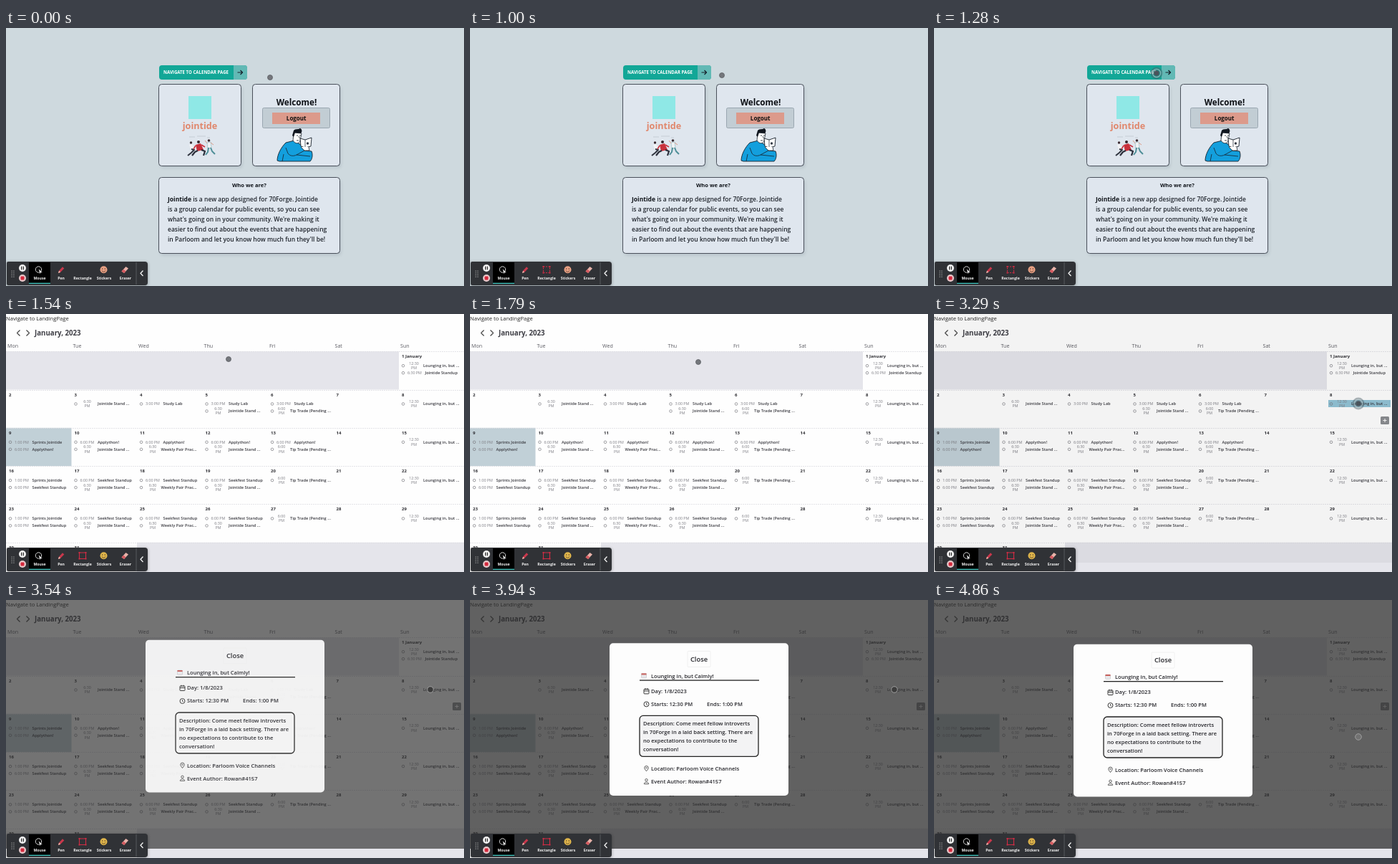
Recreate the animation shown at these times as an HTML page with a canvas. Size 640x360 px, loop 5.86 s.

```html
<!DOCTYPE html>
<html lang="en">
<head>
<meta charset="utf-8">
<title>Group calendar</title>
<style>
  html, body { margin: 0; width: 100%; height: 100%; overflow: hidden; background: #ced9de; }
  canvas { display: block; width: 640px; height: 360px; }
</style>
</head>
<body>
<canvas id="stage" width="640" height="360"></canvas>
<script>
const g = document.getElementById('stage').getContext('2d');
const LOOP = 5860;
const CALENDAR_AT = 1540, HOVER_AT = 2790, CLICK_AT = 3290, MODAL_AT = 3540;

const STEPS = [
  [0, 369, 69], [1000, 352, 66], [1140, 324, 63], [1280, 311, 63],
  [1540, 311, 63], [1790, 319, 67], [2040, 385, 86], [2290, 474, 112],
  [2540, 541, 129], [2790, 574, 128], [3040, 592, 125], [3290, 593, 125],
  [3940, 593, 125], [4200, 593, 134], [4720, 593, 178], [4860, 593, 191]
];

const EVENTS = {
  hang: { name: 'Lounging in, but ...', time: '12:30', mid: 21, x: 34 },
  stand: { name: 'Jointide Stand ...', time: '6:30', mid: 22, x: 36.5 },
  tip: { name: 'Tip Trade (Pending ...', time: '6:00', mid: 19, x: 31 },
  pair: { name: 'Weekly Pair Prac...', time: '6:30', mid: 22, x: 33.5 },
  full: { name: 'Jointide Standup', time: '6:30 PM' },
  study: { name: 'Study Lab', time: '3:00 PM' },
  sprint: { name: 'Sprints Jointide', time: '1:00 PM' },
  apply: { name: 'Applython!', time: '6:00 PM' },
  seek: { name: 'Seekfest Standup', time: '6:00 PM' }
};
const LATE_WEEK = ['sprint seek', 'seek stand', 'seek pair', 'seek stand', 'tip', '', 'hang'];
const WEEKS = [
  ['', '', '', '', '', '', 'hang full'],
  ['', 'stand', 'study', 'study stand', 'study tip', '', 'hang'],
  ['sprint apply', 'apply stand', 'apply pair', 'apply stand', 'apply tip', '', 'hang'],
  LATE_WEEK, LATE_WEEK, []
];
const colX = c => c * 91.5;
const rowY = r => 52.2 + r * 53.3;

function text(s, x, y, size, color = '#222', weight = 400, align = 'left') {
  g.font = `${weight} ${size}px "Open Sans", "Noto Sans", sans-serif`;
  g.textAlign = align;
  g.fillStyle = color;
  g.fillText(s, x, y + size * 0.34);
  return g.measureText(s).width;
}

function rect(x, y, w, h, fill) {
  g.fillStyle = fill;
  g.fillRect(x, y, w, h);
}

function box(x, y, w, h, r, fill, stroke, line = 1) {
  g.beginPath();
  g.roundRect(x, y, w, h, r);
  paint(fill, stroke, line);
}

function paint(fill, stroke, line = 1) {
  if (fill) { g.fillStyle = fill; g.fill(); }
  if (stroke) { g.strokeStyle = stroke; g.lineWidth = line; g.stroke(); }
}

function circle(x, y, r, fill, stroke, line) {
  g.beginPath();
  g.arc(x, y, r, 0, Math.PI * 2);
  paint(fill, stroke, line);
}

function shape(d, fill, stroke, line = 1) {
  const p = new Path2D(d);
  if (fill) { g.fillStyle = fill; g.fill(p); }
  if (stroke) { g.strokeStyle = stroke; g.lineWidth = line; g.stroke(p); }
}

function shadow(color, blur, dx = 0, dy = 0) {
  g.shadowColor = color;
  g.shadowBlur = blur;
  g.shadowOffsetX = dx;
  g.shadowOffsetY = dy;
}

function card(x, y, w, h) {
  g.save();
  shadow('rgba(60,75,95,.16)', 4, 2, 3);
  box(x, y, w, h, 4, '#dfe6ee');
  g.restore();
  box(x - .5, y - .5, w + 1, h + 1, 4, null, '#4a505b', 1);
}

function dancers() {
  shape('M256 152H264M267 151H279M281 153H285', null, '#b9c1c9', .7);
  // left
  circle(258.5, 160, 1.7, '#3b2a30');
  shape('M256 163L260 162L263 168L259 171Z', '#f3f4f6');
  shape('M259 169L263 170L259 174L254 178', null, '#30343f', 2);
  // middle
  circle(269, 159, 2, '#33262c');
  shape('M265 163L272 161L276 170L267 172Z', '#c9303b');
  shape('M268 171L264 173L260 178M273 170L278 172L276 178', null, '#2c2f3b', 2.2);
  shape('M265 164L262 169M273 163L278 166', null, '#c9303b', 1.5);
  // right
  circle(283.5, 157, 1.8, '#3b2a30');
  shape('M281 160L286 159L287 167L282 168Z', '#f0f2f4', '#8fb4bb', .6);
  shape('M283 167L282 173L279 177M286 167L288 172L292 176', null, '#4f8f98', 2);
  shape('M281 161L278 157M286 160L290 163', null, '#d99b86', 1);
}

function reader() {
  const ink = '#18212b';
  g.lineJoin = 'round';
  shape('M379 185C379 177 384 167 391 160L403 157L412 163L417 171L427 172C429 177 428 183 425 186H382Z', '#139fdd', ink, .9);
  shape('M391 167L394 175C397 179 402 179 406 177L417 171M386 186L388 176M406 177L425 179', null, ink, .8);
  shape('M402 146L401 157C404 162 410 162 411 157L413 147Z', '#fff', ink, .8);
  shape('M400 150L402 143C405 140 408 142 411 140C414 141 414 145 412 147L404 146L402 152Z', '#111720');
  shape('M406 150H408M410 150H412M409 151L410.500 154M406 157H409', null, ink, .8);
  shape('M411 154L418 156L427 153L426 165L418 167L412 165Z', '#fff', ink, .9);
  shape('M418 156V167', null, ink, .7);
  circle(421.5, 161, 1.7, '#353c47');
  shape('M412 166L417 171L424 171L423 166', '#fff', ink, .8);
}

function landing() {
  rect(0, 0, 640, 360, '#ced9de');
  box(214, 52, 123, 20, 4, '#12a797');
  box(318, 52, 19, 20, [0, 4, 4, 0], '#62b9b5');
  text('NAVIGATE TO CALENDAR PAGE', 220, 62.2, 6.1, '#fff', 700);
  shape('M323.500 62H330.500M327.500 59L330.500 62L327.500 65', null, '#16202a', 1.2);

  card(214, 79, 114, 113);
  rect(255, 95, 32, 32, '#8fe8e6');
  text('jointide', 271, 136.3, 12.6, '#e0876c', 700, 'center');
  dancers();

  card(345, 79, 121, 113);
  text('Welcome!', 406, 104.4, 11.7, '#0c0f14', 700, 'center');
  box(358.500, 111.500, 94, 28, 2, '#c2cdd4', '#9aa7b1', 1);
  rect(372, 118, 67, 16, '#dc9a8b');
  text('Logout', 405.7, 126.2, 8, '#111', 700, 'center');
  reader();

  card(214, 209, 252, 105);
  text('Who we are?', 340, 219.2, 7.6, '#10141a', 700, 'center');
  const ink = '#20252d', size = 8.5;
  const w = text('Jointide', 226, 238.9, size, '#10141a', 700);
  text(' is a new app designed for 70Forge. Jointide', 226 + w, 238.9, size, ink, 600);
  ['is a group calendar for public events, so you can see',
   'what\'s going on in your community. We\'re making it',
   'easier to find out about the events that are happening',
   'in Parloom and let you know how much fun they\'ll be!'
  ].forEach((s, i) => text(s, 226, 252.9 + i * 14, size, ink, 600));
}

function calendarEvent(e, x, y) {
  const gray = '#7d7d84';
  circle(x + 6, y, 1.8, null, '#77777d', .7);
  if (e.mid) {
    text(e.time, x + e.mid, y - 3.2, 5.3, gray, 400, 'center');
    text('PM', x + e.mid, y + 3, 5.3, gray, 400, 'center');
  } else {
    text(e.time, x + 12, y, 5.3, gray);
  }
  text(e.name, x + (e.x || 36.5), y, 5.7, '#3a3a40', 600);
}

function calendar(t) {
  rect(0, 0, 640, 360, '#fefefe');
  text('Navigate to LandingPage', 0, 6, 7.6, '#222');
  shape('M19.500 22.500L15.500 26.500L19.500 30.500M28.500 22.500L32.500 26.500L28.500 30.500', null, '#444', 1.2);
  text('January, 2023', 40, 26.5, 9.7, '#3f3f46', 700);
  ['Mon', 'Tue', 'Wed', 'Thu', 'Fri', 'Sat', 'Sun'].forEach((d, c) =>
    text(d, colX(c) + 2, 45, 7.1, '#5b5b62'));

  rect(0, rowY(0), colX(6), 53.3, '#e5e5eb');
  rect(colX(2), rowY(5), 457, 50, '#e5e5eb');
  rect(0, rowY(2), colX(1), 53.3, '#c1d0d7');

  g.setLineDash([2, 1]);
  for (let r = 0; r < 6; r++) shape(`M0 ${Math.round(rowY(r)) + .5}H640`, null, '#dedee3', .8);
  g.setLineDash([]);

  if (t >= HOVER_AT) {
    if (t < MODAL_AT) rect(551, 120, 87, 10, '#92c3d6');
    box(624, 143, 12, 11, 1.5, '#8b8d91');
    shape('M630 146V151M627.500 148.500H632.500', null, '#fff', 1);
  }

  WEEKS.forEach((week, r) => {
    for (let c = 0; c < 7; c++) {
      const day = r * 7 + c - 5;
      if (day < 1 || day > 31) continue;
      const x = colX(c);
      text(day === 1 ? '1 January' : day, x + 4, rowY(r) + 7, 6, '#2e2e33', 700);
      (week[c] || '').split(' ').filter(Boolean).forEach((key, i) =>
        calendarEvent(EVENTS[key], x, rowY(r) + 20 + i * 10));
    }
  });
}

function modalIcons() {
  // event
  box(239.500, 104, 7, 6.500, 1, '#e7e7ea', '#b6b6bb', .5);
  rect(239.5, 104, 7, 2, '#c8615c');
  // day
  box(243, 126, 7, 6.500, .8, null, '#222', .9);
  shape('M243 128.500H250M245 124.700V127M248 124.700V127', null, '#222', .9);
  // time
  circle(246.5, 147, 3.5, null, '#222', .9);
  shape('M246.500 145V147.200L248 148.300', null, '#222', .8);
  // place
  shape('M246.500 240.500C244.500 238 243.800 237 243.800 235.800A2.700 2.700 0 0 1 249.200 235.800C249.200 237 248.500 238 246.500 240.500Z', null, '#333', .8);
  circle(246.5, 235.8, .8, null, '#333', .6);
  // author
  circle(246.5, 252.8, 1.7, null, '#333', .8);
  shape('M243.300 258.300C243.300 255 249.700 255 249.700 258.300Z', null, '#333', .8);
}

function modal(dy, alpha) {
  g.save();
  g.globalAlpha = alpha;
  g.translate(0, dy);
  box(195, 61.8, 250, 212.700, 5, '#fdfdfd');
  box(304, 73, 32, 22, 1, null, '#ececec', .8);
  const ink = '#26262b', size = 7.55;
  const line = (s, x, y) => text(s, x, y, size, ink, 600);
  text('Close', 320, 84.2, 9.4, ink, 600, 'center');
  line('Lounging in, but Calmly!', 253, 107.7);
  rect(237, 113, 167, 1.3, '#222');
  line('Day: 1/8/2023', 253, 128.8);
  line('Starts: 12:30 PM', 253, 146.8);
  line('Ends: 1:00 PM', 331, 146.8);
  box(237, 163, 166, 57, 5, '#f3f3f4', '#222', 1.3);
  ['Description: Come meet fellow introverts',
   'in 70Forge in a laid back setting. There are',
   'no expectations to contribute to the',
   'conversation!'
  ].forEach((s, i) => line(s, 242, 174 + i * 12));
  line('Location: Parloom Voice Channels', 253, 237);
  line('Event Author: Rowan#4157', 253, 255);
  modalIcons();
  g.restore();
}

function toolbar(t) {
  g.save();
  shadow('rgba(0,0,0,.35)', 4, 0, 1);
  box(1, 326, 197, 33, [2, 4, 4, 2], '#303236');
  g.restore();
  for (let i = 0; i < 8; i++) rect(7.5 + (i % 2) * 2.8, 338.5 + (i >> 1) * 2.7, 1.2, 1.2, '#a5a5a5');

  circle(23, 335, 5, '#f2f2f2');
  rect(21, 332.7, 1.3, 4.6, '#333');
  rect(23.7, 332.7, 1.3, 4.6, '#333');
  circle(23, 349, 5, '#e9c9cb');
  box(20.500, 346.500, 5, 5, 1, '#d5283c');

  rect(32, 327, 30, 30, '#000');
  rect(32, 355.6, 30, 1.4, '#35b5ae');
  ['Mouse', 'Pen', 'Rectangle', 'Stickers', 'Eraser'].forEach((s, i) =>
    text(s, 47 + i * 30, 349, 5.2, '#f1f1f1', 700, 'center'));

  circle(45.5, 337, 4.2, null, '#eee', .9);
  shape('M45.500 336L51 341L48.500 341.300L47.300 343.500Z', '#fff', '#000', .5);

  shape('M73 342L74 338.700L79 333.300L81.300 335.500L76.200 340.700Z', '#c8384c');
  shape('M73 342L74 338.700L76.200 340.700Z', '#f0c6b6');

  if (t >= 1000) {
    g.setLineDash(t < CALENDAR_AT ? [2, 1.5] : []);
    g.strokeStyle = '#d02c44';
    g.lineWidth = 1.1;
    g.strokeRect(102.500, 333, 9, 8.500);
    g.setLineDash([]);
    for (const x of [102.5, 111.5]) for (const y of [333, 341.5]) rect(x - 1, y - 1, 2, 2, '#d02c44');
  }

  circle(136.5, 337.3, 5, t < CALENDAR_AT ? '#e9a184' : '#e0b64b');
  circle(134.7, 336, .7, '#4a3327');
  circle(138.3, 336, .7, '#4a3327');
  shape('M133.800 338.500Q136.500 342 139.200 338.500', null, '#4a3327', .8);

  shape('M161.500 339.500L167.500 333L171 335.500L165 342Z', '#e8b3aa');
  shape('M161.500 339.500L164 336.800L167.500 339.300L165 342Z', '#d65a60');

  rect(181.5, 327, 1, 31, '#55585c');
  shape('M191.500 338.500L188 342.300L191.500 346', null, '#f4f4f4', 1.3);
}

function pointer(x, y, t) {
  const pressed = (t >= 1280 && t < CALENDAR_AT) || (t >= CLICK_AT && t < MODAL_AT);
  if (pressed) {
    circle(x, y, 8.5, 'rgba(75,95,105,.45)');
    circle(x, y, 5.6, null, 'rgba(200,220,224,.6)', 1.2);
    circle(x, y, 3.6, '#4a535b');
  } else if (t >= MODAL_AT) {
    circle(x, y, 4.3, t < 4200 ? '#3c3c3c' : '#727272', '#a0a0a0', 1);
  } else {
    circle(x, y, 3.5, '#74777c', '#5d6065', .8);
  }
}

function draw(t) {
  const [start, x, y] = STEPS.filter(s => s[0] <= t).pop();
  if (t < CALENDAR_AT) {
    landing();
  } else {
    calendar(t);
    if (t >= MODAL_AT) {
      const opening = t < 3940;
      rect(0, 0, 640, 347, `rgba(44,44,44,${opening ? .66 : .74})`);
      modal(opening ? -6 : t < 4200 ? -1.6 : 0, opening ? .92 : 1);
    } else if (start >= CLICK_AT) {
      rect(0, 0, 640, 347, 'rgba(0,0,0,.042)');
    }
  }
  toolbar(t);
  pointer(x, y, t);
}

function tick() {
  draw(performance.now() % LOOP);
  requestAnimationFrame(tick);
}
tick();
</script>
</body>
</html>
```
